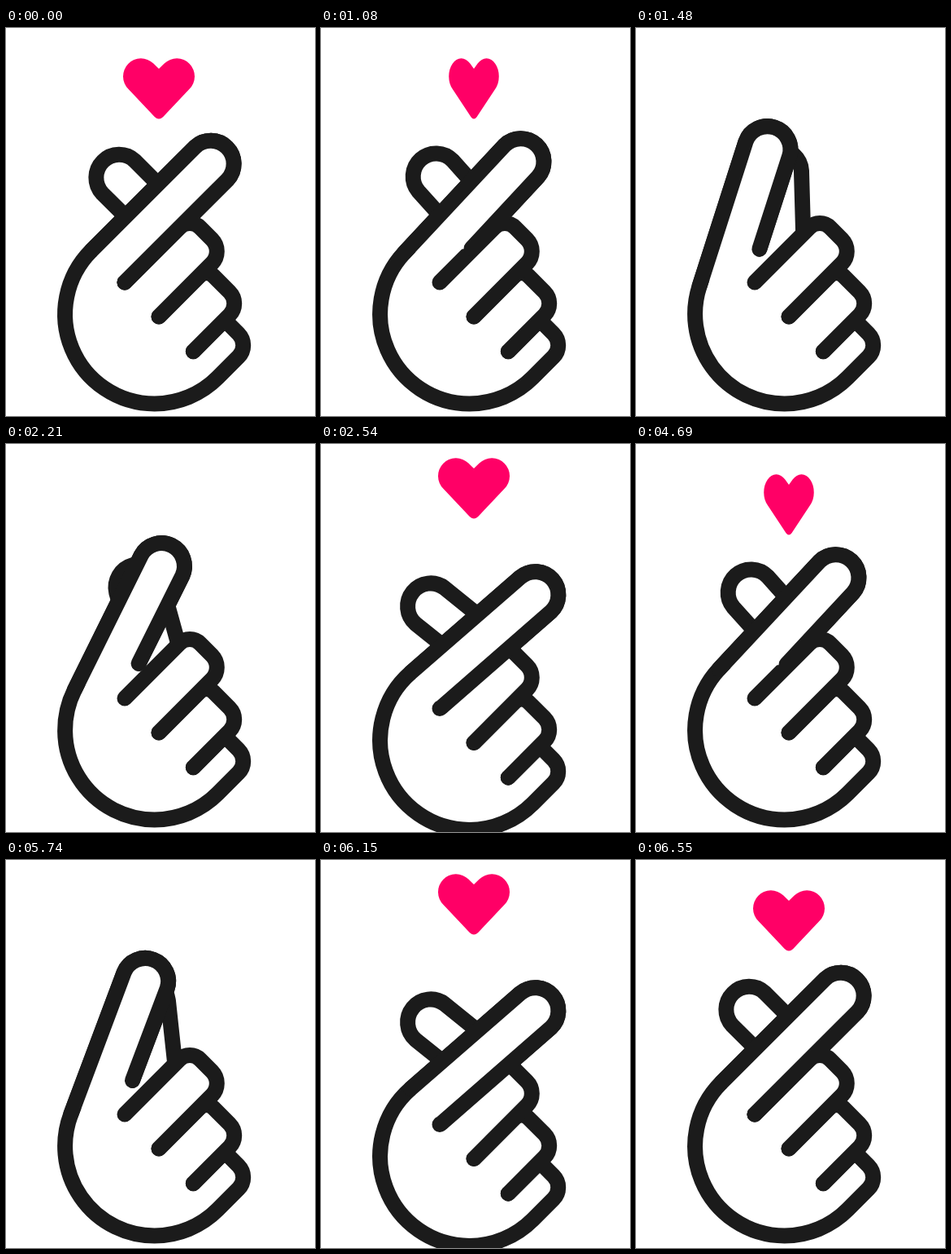
Animation, 380 px wide and 476 px high, one loop 7.22 s. Source, as an HTML page:

```html
<!DOCTYPE html>
<html lang="en">
<head>
<meta charset="utf-8">
<title>Finger heart</title>
<style>
  html, body { margin: 0; width: 100%; height: 100%; overflow: hidden; background: #fff; }
  svg { display: block; width: 100%; height: 100%; }
  #hand { fill: #fff; stroke: #1b1b1b; stroke-width: 19; stroke-linecap: round; stroke-linejoin: round; }
  #heart { fill: #ff0066; }
</style>
</head>
<body>
<svg viewBox="0 0 380 476">
  <path id="heart" d="M188 50 L181.3 43.6 A21.8 21.8 0 0 0 150.6 75 L183 109.2 Q188 114 193 109.2
    L225.4 75 A21.8 21.8 0 0 0 194.7 43.6 Z"/>
  <g id="hand">
    <path id="thumb" d="M174 258 L118.5 203 A28.3 28.3 0 0 1 158.5 163 L213.5 218"/>
    <path id="palm"/>
    <path d="M188 354 L238 304 A12 12 0 0 1 255 304 L274.9 323.9 A20 20 0 0 1 274.9 352.1 L230.3 396.7"/>
    <path d="M146 312 L213.3 244.7 A18 18 0 0 1 238.7 244.7 L253.2 259.2 A21 21 0 0 1 253.2 288.8 L188 354"/>
    <path id="index"/>
  </g>
</svg>
<script>
  const PERIOD = 3610;
  const OPEN = 31.8, OVERSHOOT = -5.2;
  const PIVOT = [170, 345], PALM = [182.6, 351], PALM_R = 110, TIP_R = 28.3;
  const get = id => document.getElementById(id);
  const heart = get('heart'), hand = get('hand'), thumb = get('thumb');
  const palm = get('palm'), index = get('index');

  const ease = (t, from, to) => {
    const p = Math.min(1, Math.max(0, (t - from) / (to - from)));
    return p * p * (3 - 2 * p);
  };

  // The motion advances in held steps of 80 ms.
  function snap(t) {
    const base = [2220, 1970, 1000].find(start => t >= start) || 0;
    return base + 80 * Math.floor((t - base) / 80);
  }

  function rotate([x, y], degrees) {
    const a = degrees * Math.PI / 180, c = Math.cos(a), s = Math.sin(a);
    const dx = x - PIVOT[0], dy = y - PIVOT[1];
    return [PIVOT[0] + dx * c - dy * s, PIVOT[1] + dx * s + dy * c];
  }

  const point = p => p.map(v => v.toFixed(2)).join(' ');

  // The index finger ends where its edge touches the palm circle.
  function indexPath(angle) {
    const turn = p => point(rotate(p, -angle));
    const a = (225 - angle) * Math.PI / 180;
    const tangent = [PALM[0] + PALM_R * Math.cos(a), PALM[1] + PALM_R * Math.sin(a)];
    const root = angle > 0 ? [187.5, 271] : [146, 312];
    return `M${turn(root)} L${turn([272.5, 186])}
      A${TIP_R} ${TIP_R} 0 0 0 ${turn([232.5, 146])} L${point(tangent)}`;
  }

  const palmArc = `A${PALM_R} ${PALM_R} 0 0 0`;
  const palmEdge = `${palmArc} ${PALM[0]} 461 ${palmArc} 260.4 428.8
    L285.9 403.3 A20 20 0 0 0 285.9 375.1 L268.9 358.1 L230.3 396.7`;

  function draw(now) {
    const t = snap(now % PERIOD);
    const settle = 1 - ease(t, 2620, 2940);
    const angle = t < 2620
      ? OPEN * ease(t, 980, 1640) + (OVERSHOOT - OPEN) * ease(t, 1930, 2620)
      : OVERSHOOT * settle;
    const recoil = ease(t, 2340, 2620) * settle;
    const width = 1 - ease(t, 980, 1255) + ease(t, 2220, 2500);

    const finger = indexPath(angle);
    index.setAttribute('d', finger);
    palm.setAttribute('d', finger + palmEdge);
    thumb.setAttribute('transform', `rotate(${angle * 1.6} 166 225.5)`);
    hand.setAttribute('transform', `translate(0 ${15.5 * recoil})`);
    heart.setAttribute('transform', `translate(188 ${-25 * recoil}) scale(${width} 1) translate(-188 0)`);
    heart.setAttribute('visibility', width > 0.01 ? 'visible' : 'hidden');
  }

  const start = performance.now();
  function frame() {
    draw(performance.now() - start);
    requestAnimationFrame(frame);
  }
  frame();
</script>
</body>
</html>
```
